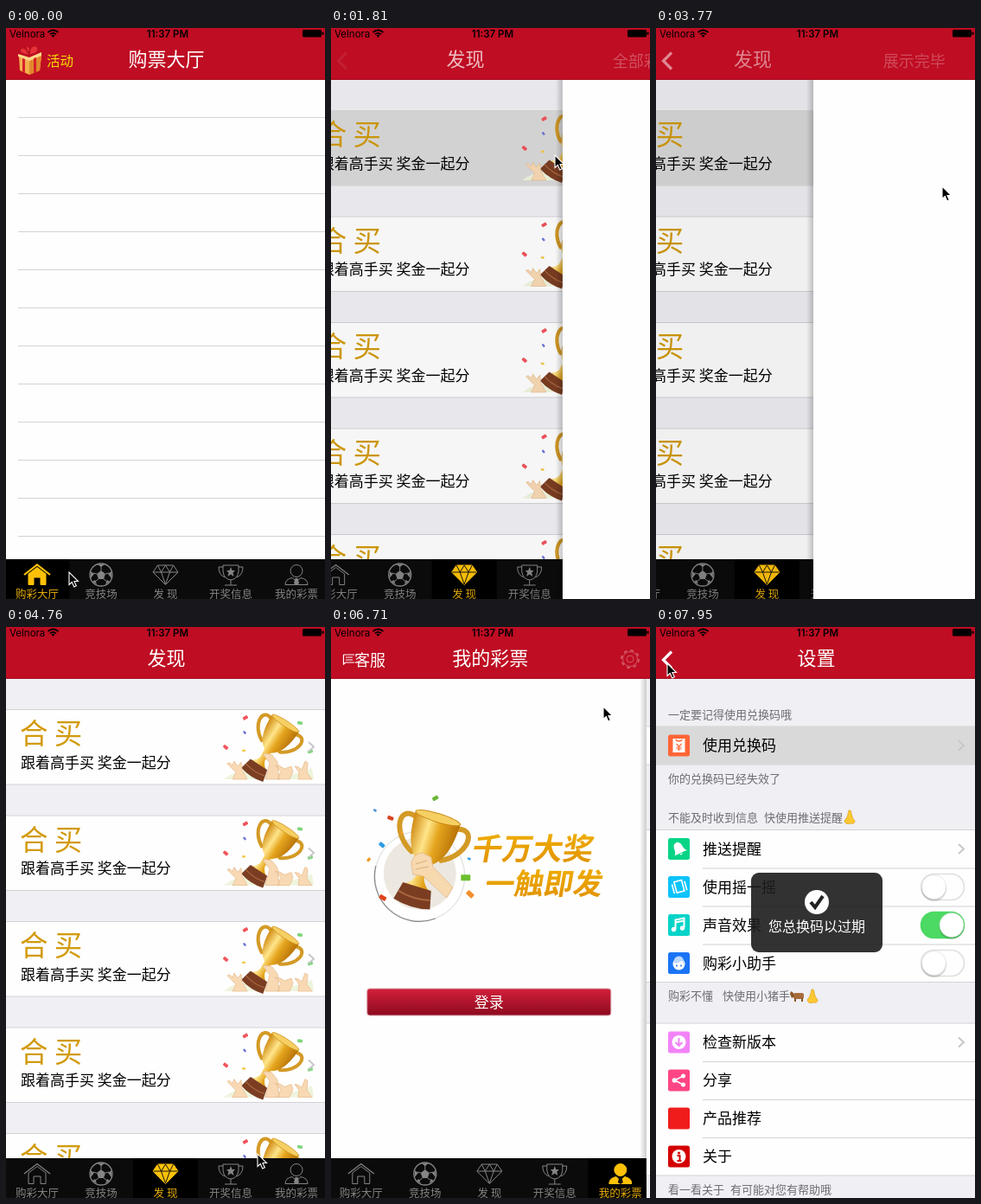
Animation, 369 px wide and 660 px high, one loop 8 s. Source, as an HTML page:

```html
<!DOCTYPE html>
<html lang="zh">
<head>
<meta charset="utf-8">
<title>购票大厅</title>
<style>
html, body { margin: 0; width: 100%; height: 100%; overflow: hidden; background: #fff; }
svg { display: block; width: 369px; height: 660px; overflow: hidden; }
text { font-family: "Noto Sans CJK SC", "Noto Sans CJK JP", "Noto Sans CJK", sans-serif; white-space: pre; }
.latin { font-family: Inter, Roboto, sans-serif; }
</style>
</head>
<body>
<svg id="stage" viewBox="0 0 369 660" xmlns="http://www.w3.org/2000/svg"></svg>
<script>
const W = 369, LOOP = 8000;
const RED = '#bf0d23', GREY = '#6d6d72', LINE = '#d3d2d7', GOLD = '#ffc107';

// ---- drawing helpers ----
const rect = (x, y, w, h, fill, extra = '') =>
  `<rect x="${x}" y="${y}" width="${w}" height="${h}" fill="${fill}" ${extra}/>`;
const circle = (x, y, r, fill, extra = '') => `<circle cx="${x}" cy="${y}" r="${r}" fill="${fill}" ${extra}/>`;
const fillPath = (d, fill, extra = '') => `<path d="${d}" fill="${fill}" ${extra}/>`;
const strokePath = (d, color, width = 1, extra = '') =>
  `<path d="${d}" fill="none" stroke="${color}" stroke-width="${width}" ${extra}/>`;
const hline = (x, y) => rect(x, y, W - x, 1, LINE);
const at = (x, y, body, more = '') => `<g transform="translate(${x} ${y}) ${more}">${body}</g>`;
const group = (id, body) => `<g id="${id}">${body}</g>`;
// y is the optical centre of the CJK glyph box
const text = (s, x, y, size, fill = '#000', extra = '') =>
  `<text x="${x}" y="${y + size * .38}" font-size="${size}" fill="${fill}" ${extra}>${s}</text>`;
const MID = 'text-anchor="middle"';
const chevron = y => strokePath(`M350 ${y - 5.5}l6 5.5-6 5.5`, '#c7c7cc', 2);
const confetti = list => list.map(([x, y, color, angle, size = 5]) =>
  at(x, y, rect(-size / 2, -size / 3, size, size / 1.6, color, 'rx="1"'), `rotate(${angle})`)).join('');

const defs = `<defs>
  <linearGradient id="gold"><stop stop-color="#d08a12"/><stop offset=".35" stop-color="#ffe58a"/>
    <stop offset=".6" stop-color="#e5a51e"/><stop offset="1" stop-color="#b87308"/></linearGradient>
  <linearGradient id="brush" x2="0" y2="1"><stop stop-color="#f2b300"/><stop offset="1" stop-color="#e08f00"/></linearGradient>
  <linearGradient id="button" x2="0" y2="1"><stop stop-color="#d3203b"/><stop offset="1" stop-color="#8c0a1e"/></linearGradient>
  <linearGradient id="edge"><stop stop-color="#000" stop-opacity="0"/><stop offset="1" stop-color="#000" stop-opacity=".2"/></linearGradient>
</defs>`;

// Trophy standing on the origin, about 110 high
const cup =
  strokePath('M-25-100C-48-108-46-74-18-60M25-100C48-108 46-74 18-60', '#d49a26', 6, 'stroke-linecap="round"') +
  fillPath('M-27-106H27Q27-62 6-50L5-34Q8-26 15-22H-15Q-8-26-5-34L-6-50Q-27-62-27-106Z', 'url(#gold)') +
  '<ellipse cy="-106" rx="27" ry="5" fill="#f6cf62" stroke="#c98a14"/>' +
  fillPath('M-17-23H17L22-2Q0 4-22-2Z', '#7a3d22') +
  strokePath('M-19-12Q0-7 19-12', '#a8663f', 2);

// ---- tab bar ----
const tabs = [
  { name: 'hall', label: '购彩大厅', title: '购票大厅', x: 36 },
  { name: 'arena', label: '竞技场', title: '竞技场', x: 110 },
  { name: 'find', label: '发 现', title: '发现', x: 184.5 },
  { name: 'draw', label: '开奖信息', title: '开奖信息', x: 260 },
  { name: 'mine', label: '我的彩票', title: '我的彩票', x: 336 },
];
const icons = {
  hall: (c, f) => strokePath('M-15 0L0-11.500 15 0', c, f === 'none' ? 1.2 : 2.2) +
    fillPath('M-10-1V11.500H-4V3H4V11.500H10V-1L0-8.500Z', f, `stroke="${c}"`),
  arena: (c, f) => circle(0, 0, 13, f, `stroke="${c}" stroke-width="1.3"`) +
    fillPath('M0-5L5-1 3 5H-3L-5-1ZM-4-12H4L0-9ZM12-4V4L8-1ZM-12-4V4L-8-1ZM5 11L10 8 7 6ZM-5 11L-10 8-7 6Z', f === 'none' ? c : '#111') +
    strokePath('M0-5V-10M5-1L9-2M-5-1L-9-2M3 5L7 8M-3 5L-7 8', f === 'none' ? c : '#111'),
  find: (c, f) => fillPath('M-9-11H9L14.500-3 0 11.500-14.500-3Z', f, `stroke="${c}"`) +
    strokePath('M-14-3H14M-9-11L-5-3 0 11 5-3 9-11M-5-3L0-11 5-3', f === 'none' ? c : '#111'),
  draw: (c, f) => fillPath('M-9-11H9V-4Q8 5 0 6-8 5-9-4Z', f, `stroke="${c}"`) +
    strokePath('M-9-9H-14Q-14 0-7 3M9-9H14Q14 0 7 3M0 6V12M-7 12H7', c) +
    fillPath('M0-9L1.500-5H5L2.500-2.500 3.500 2 0-.5-3.500 2-2.500-2.500-5-5H-1.500Z', c),
  mine: (c, f) => circle(0, -4.500, 7, f, `stroke="${c}"`) +
    fillPath('M-13 11.500Q-13 5-5 3.500L0 8 5 3.500Q13 5 13 11.500Z', f, `stroke="${c}"`) +
    fillPath('M-1.500 4H1.500L3 10 0 12-3 10Z', f === 'none' ? c : '#111'),
};
const tabBar = active => rect(0, 614, W, 46, '#0b0b0b') + tabs.map(({ name, label, x }) => {
  const on = name === active, color = on ? GOLD : '#858585';
  return (on ? rect(x - 37.5, 614, 75, 46, '#000') : '') +
    at(x, 632, icons[name](color, on ? color : 'none')) +
    text(label, x, 654, 12.5, on ? '#e8ad08' : '#858585', MID);
}).join('');

// ---- pages ----
const prize = at(250, 0,
  fillPath('M2 81Q20 66 45 74T104 68L106 81Z', '#eef4dc') +
  at(34, 77, cup, 'rotate(33) scale(.68)') +
  fillPath('M12 81L16 73 6 63Q8 60 12 65L14 60 18 66 22 61 23 70 29 81ZM50 81L55 62 47 52Q52 50 58 53L64 61 66 81ZM64 81L68 72 61 65Q66 64 72 69L80 66 82 72 78 81ZM88 81L89 73 84 66Q89 66 92 70L96 60 99 62 98 73 104 81Z', '#f8d9b4', 'stroke="#e6b98b" stroke-width=".7"') +
  confetti([[27, 10, '#f0545c', -30, 6], [26, 27, '#6a76d8', 50, 4], [4, 44, '#f0545c', 40, 6],
    [25, 48, '#f2c94c', 10, 4], [90, 16, '#7ed67c', 10, 6], [102, 49, '#7ed67c', -20, 6]]));
const cell = i => {
  const top = 95 + i * 122.5;
  return at(0, top, rect(0, 0, W, 87, '#fefefe') + hline(0, 0) + hline(0, 86.5) +
    (i ? '' : rect(0, 0, W, 87, '#d9d9d9', 'id="cellTint"')) +
    text('合 买', 16, 28, 32.5, '#d29a0c', 'font-weight="300"') +
    text('跟着高手买 奖金一起分', 17, 61.5, 17) +
    at(0, 0, prize) + chevron(43.5));
};
const logo =
  circle(104, 288, 52, '#fff', 'stroke="#d8d8d8"') +
  strokePath('M53 276A52 52 0 0 0 122 337', '#8a8a8a', 1.2) +
  circle(104, 285, 42, '#ece8e0') +
  at(94, 322, cup, 'rotate(17)') +
  fillPath('M94 272Q98 261 107 261L117 266 119 277 142 301 135 313 108 288 96 286Z', '#f7d9b0', 'stroke="#e3b886" stroke-width=".8"') +
  strokePath('M99 274L112 270M99 280L114 277', '#dcae7c', 1) +
  confetti([[52, 212, '#4a90d9', 30, 4], [70, 221, '#d9431e', 20, 7], [122, 198, '#6bb536', -30, 7],
    [60, 252, '#2d9be0', 40, 7], [45, 269, '#f09a24', -50], [61, 313, '#e0431c', 30, 8], [83, 238, '#f0a030', 60, 4],
    [157, 290, '#6cc030', 0, 11], [162, 309, '#f09030', 45, 9], [161, 268, '#3aa0e0', 20, 4]]) +
  at(165, 256, text('千万大奖', 0, 0, 35, 'url(#brush)', 'font-weight="900"'), 'skewX(-10)') +
  at(180, 296, text('一触即发', 0, 0, 34, 'url(#brush)', 'font-weight="900"'), 'skewX(-10)');

const white = rect(0, 0, W, 660, '#fefefe');
const rules = Array.from({ length: 12 }, (_, i) => hline(14, 103 + i * 44)).join('');
const pages = {
  hall: white + rules,
  arena: white,
  find: rect(0, 0, W, 660, '#efeff4') + [0, 1, 2, 3, 4].map(cell).join(''),
  mine: white + logo + rect(43, 418, 282, 31, 'url(#button)', 'rx="3" stroke="#d8a0a8"') +
    text('登录', 184, 434, 17, '#fff', MID),
};

// ---- settings page ----
const W1 = 'fill="none" stroke="#fff" stroke-width="1.6"';
const glyphs = {
  ticket: fillPath('M-7-8H7V8H-7Z', '#fff') + strokePath('M-4-7Q0-3 4-7M-3-2L0 1 3-2M0 1V6M-3 2H3M-3 4H3', '#ff6536', 1.2),
  bell: at(0, 0, fillPath('M-8 5Q-5 3-5-2-4-8 0-8T5-2Q5 3 8 5ZM-2 6H2Q0 9-2 6Z', '#fff'), 'rotate(-25)'),
  cards: at(0, 0, `<rect x="-4" y="-7" width="9" height="13" ${W1}/><path d="M-7-5V6M8-5V6" ${W1}/>`, 'rotate(-15)'),
  note: strokePath('M-4 5V-6L6-8V3M-4-3L6-5', '#fff', 2) + circle(-6, 5, 2.7, '#fff') + circle(4, 3.5, 2.7, '#fff'),
  helper: circle(0, 1, 7, '#fff') + fillPath('M-6 0Q2 0 3-3L6 1Q6-8 0-8T-6 0Z', '#bcd8ff') +
    circle(-2.5, 3, 1, '#1b74f5') + circle(2.5, 3, 1, '#1b74f5'),
  down: circle(0, 0, 8, '#fff') + strokePath('M0-5V4M-4 0L0 4 4 0', '#f283f7', 2),
  share: strokePath('M5-5L-5 0 5 5', '#fff', 1.4) + circle(5, -5, 2.5, '#fff') + circle(-5, 0, 2.8, '#fff') + circle(5, 5, 2.5, '#fff'),
  plain: '',
  info: circle(0, 0, 8, '#fff') + circle(0, -4, 1.6, '#d40000') + strokePath('M-2-1H1V5M-2 5H3', '#d40000', 2),
};
const toggle = (y, on) =>
  rect(306.5, y - 15, 50, 30, on ? '#4cd964' : '#fefefe', `rx="15" stroke="${on ? '#4cd964' : '#dedee0'}" stroke-width="1.5"`) +
  circle(on ? 342 : 321.5, y + 2, 14.5, '#000', 'opacity=".15"') +
  circle(on ? 342 : 321.5, y, 14, '#fff', 'stroke="#ccc" stroke-width=".5"');
const nose = (x, y) => at(x, y, fillPath('M-1-8Q2-9 2-4 3 1 6 4 6 8 1 7-5 9-6 4-2 0-1-8Z', '#fcc832', 'stroke="#dca01c" stroke-width=".7"'));
const cow = (x, y) => at(x, y, rect(-5, -4, 12, 7, '#a86c3c', 'rx="2"') +
  fillPath('M-9-3L-8-6-5-4-4 0-7 2ZM-4 2V6H-2V2ZM4 2V6H6V2Z', '#8c5528'));

const sections = [
  [[137, '使用兑换码', '#ff6536', 'ticket', 'more']],
  [[256.5, '推送提醒', '#08d486', 'bell', 'more'], [300.5, '使用摇一摇', '#0cc3fb', 'cards', 'off'],
   [344.5, '声音效果', '#06d3c8', 'note', 'on'], [388.5, '购彩小助手', '#1b74f5', 'helper', 'off']],
  [[480, '检查新版本', '#f283f7', 'down', 'more'], [524, '分享', '#ff4585', 'share'],
   [568, '产品推荐', '#f01c1c', 'plain'], [612, '关于', '#d40000', 'info']],
];
const row = ([y, label, color, glyph, control], i) =>
  (i ? hline(54, y - 22) : '') + rect(14, y - 12.5, 25, 25, color, 'rx="2.5"') + at(26.5, y, glyphs[glyph]) +
  text(label, 54, y, 17) +
  (control === 'more' ? chevron(y) : control ? toggle(y, control === 'on') : '');
const section = rows => {
  const top = rows[0][0] - 22, height = rows.length * 44;
  return rect(0, top, W, height, '#fefefe') + hline(0, top - .5) + hline(0, top + height - .5) +
    (rows.length === 1 ? rect(0, top, W, height, '#d9d9d9', 'id="rowTint"') : '') + rows.map(row).join('');
};
const notes = [
  ['一定要记得使用兑换码哦', 14, 101], ['你的兑换码已经失效了', 14, 175],
  ['不能及时收到信息', 14, 220], ['快使用推送提醒', 125, 220],
  ['购彩不懂', 14, 426.5], ['快使用小猪手', 77, 426.5],
  ['看一看关于', 14, 650], ['有可能对您有帮助哦', 86, 650],
].map(([s, x, y]) => text(s, x, y, 13, GREY)).join('');
const settings = rect(0, 0, W, 660, '#efeff4') + sections.map(section).join('') + notes +
  nose(224, 220) + cow(164, 427) + nose(181, 427);
const toast = rect(110, 284, 152, 92, '#1c1c1c', 'rx="9" opacity=".9"') + circle(186, 318, 14, '#fff') +
  strokePath('M179 318L184 324 193 311', '#222', 4) + text('您总换码以过期', 186, 346, 16, '#fff', MID);

// ---- navigation bar ----
const gift = fillPath('M15 33L27 37V54L16 49ZM27 37L41 32 39 49 27 54Z', '#f3b04c') +
  fillPath('M27 37L41 32 39 49 27 54Z', '#e08a2c') + fillPath('M14 30L27 34 41 28V32L27 38 14 33Z', '#ffd98a') +
  fillPath('M19 35L22 36V52L19 50ZM32 35L35 34V51L32 52Z', '#d8202a') +
  fillPath('M27 31Q14 30 17 24 22 21 27 31 28 19 35 21 41 28 27 31ZM25 29L23 20 28 24Z', '#e8323a', 'stroke="#a80f18" stroke-width=".7"');
const gear = at(346, 37, circle(0, 0, 4, 'none', 'stroke="#fff"') +
  circle(0, 0, 8.5, 'none', 'stroke="#fff"') +
  circle(0, 0, 10, 'none', 'stroke="#fff" stroke-width="2" stroke-dasharray="3.9 3.95"'));
const service = strokePath('M14.500 32H27M14.500 32V43L17 41H27M17 35H25M17 38H25', '#fff', 1.2) + text('客服', 27, 38, 18, '#fff');
const bigTitle = (id, s) => text(s, 185.5, 36, 22, '#fff', `${MID} id="${id}" font-weight="500"`);
const nav = rect(0, 0, W, 60, RED) + rect(0, 59.5, W, .5, '#8e0a1a') +
  group('hallItems', gift + text('活动', 47, 38, 15.5, '#f4e000', 'font-weight="500"')) +
  group('mineItems', service + group('gear', gear)) +
  bigTitle('rootTitle', '') +
  group('lotteryTitle', text('全部彩种', 142, 38, 18, '#fff', 'id="lotteryText" font-weight="300"') +
    fillPath('M215 34H228Q230 34 229 36L223 43Q221.500 44.500 220 43L214 36Q213 34 215 34Z', GOLD, 'id="arrow"')) +
  bigTitle('settingsTitle', '设置') +
  strokePath('M18 28.500L8.500 38 18 47.500', '#fff', 3.2, 'id="back"');
const statusBar =
  '<text class="latin" x="4" y="10.500" font-size="11.500">Velnora</text>' +
  strokePath('M48.500 5Q54.500 0 60.500 5M51 7.300Q54.500 4.300 58 7.300', '#000', 1.7) + fillPath('M52.500 8.500Q54.500 7 56.500 8.500L54.500 11Z', '#000') +
  `<text class="latin" x="187" y="10.500" font-size="11.500" font-weight="600" ${MID}>11:37 PM</text>` +
  rect(343, 2, 22, 8.500, '#000', 'rx="1.500"') + rect(365.5, 4.5, 2, 3.500, '#000', 'rx="1"');
const pointer = fillPath('M0 0V14.500L3.300 11.500 5.700 17 8.300 15.800 5.900 10.500H10.500Z', '#000', 'stroke="#fff" stroke-width="1.100"');

const shadow = rect(-8, 60, 8, 600, 'url(#edge)');
document.getElementById('stage').innerHTML = defs +
  group('root', Object.entries(pages).map(([name, body]) => group(name, body + tabBar(name))).join('')) +
  rect(0, 0, W, 660, '#000', 'id="dim"') +
  group('lottery', shadow + white) + group('settings', shadow + settings) +
  nav + statusBar + group('toast', toast) + group('cursor', pointer);

// ---- motion ----
const clamp = v => Math.min(1, Math.max(0, v));
const smooth = u => u * u * (3 - 2 * u);
const easeOut = u => 1 - (1 - u) ** 3;
function sample(keys, t, ease) {
  let i = 1;
  while (i < keys.length - 1 && t >= keys[i][0]) i++;
  const [t0, ...a] = keys[i - 1], [t1, ...b] = keys[i];
  const u = ease(clamp((t - t0) / (t1 - t0)));
  return a.map((v, k) => v + (b[k] - v) * u);
}
const cursorPath = [ // time, x, y
  [0, 73, 629], [50, 73, 629], [350, 108, 630], [940, 110, 632], [1180, 184, 632], [1300, 184, 632],
  [1640, 259, 147], [1870, 259, 147], [2380, 57, 133], [2550, 57, 133], [2800, 185, 36], [3000, 185, 36],
  [3300, 149, 183], [3430, 149, 183], [3768, 331, 183], [3828, 331, 183], [3960, 352, 183], [4290, 352, 183],
  [4730, 291, 609], [4820, 291, 609], [5300, 336, 630], [5900, 336, 630], [6350, 346, 34], [6540, 346, 34],
  [6700, 315, 92], [6770, 315, 92], [7180, 200, 130], [7450, 200, 130], [7940, 13, 42], [8000, 13, 42],
];
const pushPath = [ // time, share of the pushed page on screen
  [0, 0], [1750, 0], [1806, .274], [1868, .274], [2280, 1], [3828, 1], [3829, .507], [4010, 0],
  [6700, 0], [6710, .011], [6770, .011], [7230, 1], [8000, 1],
];
const tabSwitches = [[5400, 'mine'], [1250, 'find'], [420, 'arena'], [0, 'hall']];
const DRAG = { from: 3430, to: 3828, x: 149 };

const el = id => document.getElementById(id);
const show = (id, opacity) => {
  el(id).setAttribute('opacity', opacity);
  el(id).style.display = opacity > 0 ? '' : 'none';
};
const move = (id, x, y = 0) => el(id).setAttribute('transform', `translate(${x} ${y})`);

function render(t) {
  const [cx, cy] = sample(cursorPath, t, smooth);
  const dragging = t >= DRAG.from && t < DRAG.to;
  const p = dragging ? 1 - (cx - DRAG.x) / W : sample(pushPath, t, easeOut)[0];
  const popping = t >= DRAG.from && t < 4300;
  const tab = tabSwitches.find(([start]) => t >= start)[1];
  const inSettings = tab === 'mine';

  Object.keys(pages).forEach(name => show(name, +(name === tab)));
  move('cursor', cx, cy);
  move('root', -.3 * W * p);
  show('dim', .11 * p);
  const top = inSettings ? 'settings' : 'lottery';
  show('lottery', +(!inSettings && p > 0));
  show('settings', +(inSettings && p > 0));
  move(top, W * (1 - p));

  el('rootTitle').textContent = tabs.find(({ name }) => name === tab).title;
  move('rootTitle', -(popping ? 145 : 109) * p);
  show('rootTitle', 1 - p);
  const titleOpacity = popping ? p * p : p;
  show('lotteryTitle', inSettings ? 0 : titleOpacity);
  show('settingsTitle', inSettings ? titleOpacity : 0);
  move(top + 'Title', (popping ? 245 : 253) * (1 - p));
  show('back', popping ? p : p * p);
  show('hallItems', +(tab === 'hall'));
  show('mineItems', inSettings ? 1 - p : 0);
  show('gear', t > 6480 ? .3 : 1);

  const opened = t >= 2860;
  el('lotteryText').textContent = opened ? '展示完毕' : '全部彩种';
  show('arrow', +!opened);
  show('cellTint', t < 1690 ? 0 : 1 - clamp((t - 4000) / 220));
  show('rowTint', +(t >= 7340));
  show('toast', clamp((t - 7540) / 180));
}

const start = performance.now();
function tick() {
  render((performance.now() - start) % LOOP);
  requestAnimationFrame(tick);
}
tick();
</script>
</body>
</html>
```
